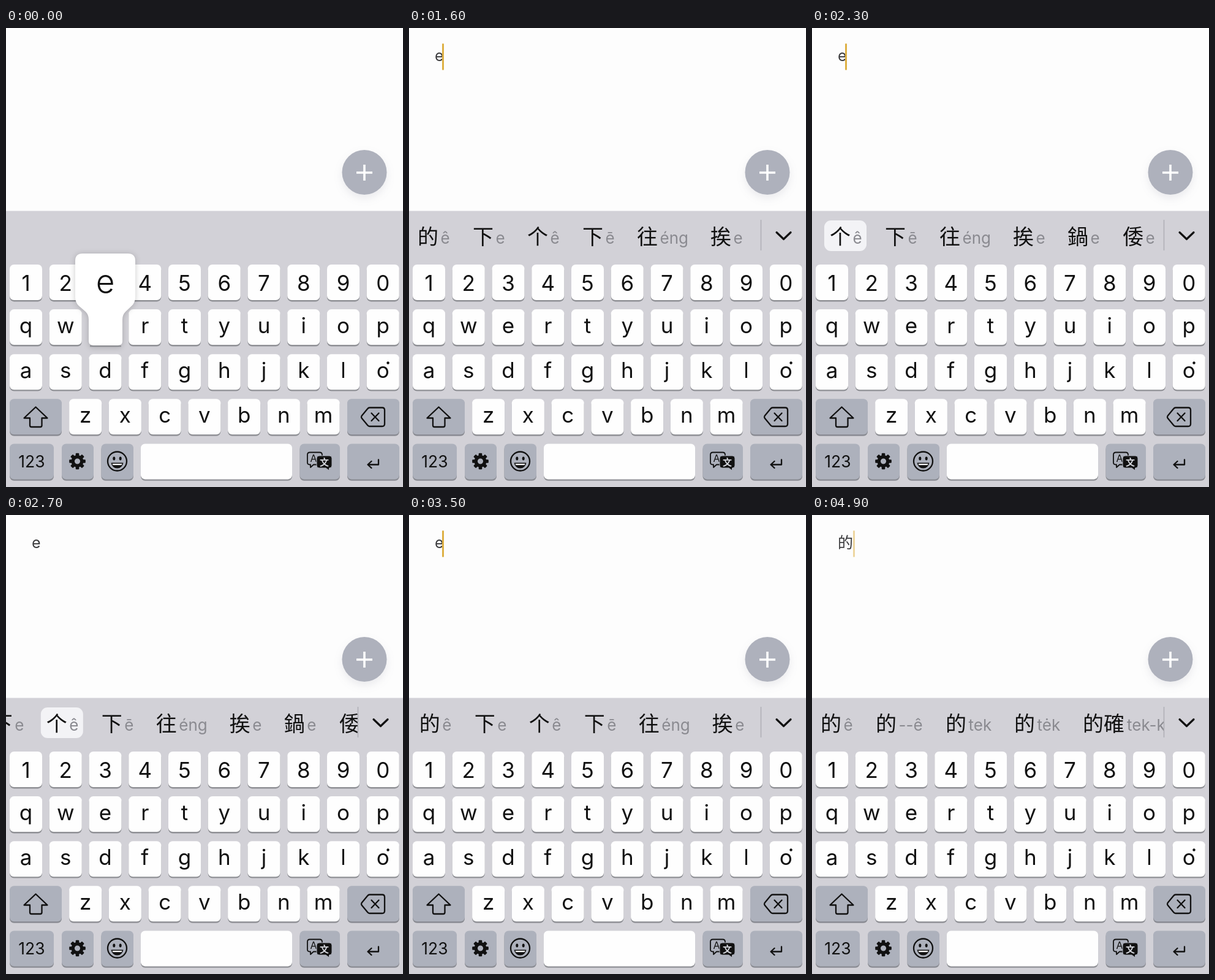
Write an HTML page that moves like this. It is 648 by 749 pixels and loops after 5 s.

```html
<!DOCTYPE html>
<html lang="en">
<head>
<meta charset="utf-8">
<title>Keyboard suggestions</title>
<style>
  html, body { margin: 0; width: 100%; height: 100%; overflow: hidden; background: #fdfdfd; }
  svg { display: block; width: 100vw; height: 100vh; }
  text { font-family: Inter, "Noto Sans CJK SC", "Noto Sans CJK TC", "Noto Sans CJK JP", "Noto Sans CJK", sans-serif; fill: #111; }
  .mid { text-anchor: middle; }
  .sound { font-size: 26px; fill: #8a8a90; }
  .word { font-size: 34px; }
  .line { fill: none; stroke: #111; stroke-width: 2.3; stroke-linejoin: round; stroke-linecap: round; }
  #bubble { filter: drop-shadow(0 1px 5px #0003); }
  #add circle { filter: drop-shadow(0 6px 7px #5050701c); }
</style>
</head>
<body>
<svg viewBox="0 0 648 749" preserveAspectRatio="none">
  <defs><clipPath id="strip"><path d="M0 300H574V380H0z"/></clipPath></defs>

  <text id="typed" x="42" y="54" font-size="25" style="fill:#3a3a3c"></text>
  <rect id="caret" y="25.5" width="3" height="43" fill="#deb044"/>

  <g id="add">
    <circle cx="585" cy="235.5" r="36.5" fill="#aeb1bc"/>
    <path d="M572 236H598M585 223V249" stroke="#fff" stroke-width="3.6"/>
  </g>

  <path d="M0 298.5H648V749H0z" fill="#d2d1d7"/>

  <g id="bar">
    <g clip-path="url(#strip)">
      <rect id="press" y="314" width="69" height="50" rx="11" fill="#f3f3f6"/>
      <g id="first"></g>
      <g id="second"></g>
    </g>
    <path d="M574.5 313V363" stroke="#afafb5" stroke-width="1.5"/>
    <path class="line" d="M600 333.500L611.500 344.500L623 333.500" style="stroke-width:3.2"/>
  </g>

  <g id="keys"></g>

  <g id="icons">
    <path class="line" d="M48.500 618.500L67.500 636.500H58.500V648.500Q58.500 651 56 651H41.500Q39 651 39 648.500V636.500H29.500z"/>
    <path class="line" d="M593.500 619.500H614Q618 619.500 618 623.500V646Q618 650 614 650H593.500Q591.500 650 590 648L580.500 636.500Q579.500 634.800 580.500 633L590 621.500Q591.500 619.500 593.500 619.500zM596.500 628.500L608.500 641M608.500 628.500L596.500 641"/>
    <path class="line" d="M608 704.500V712.500H591M596.500 707L590.500 712.500L596.500 718"/>

    <g transform="translate(116.500 707)">
      <circle r="7.300" fill="none" stroke="#111" stroke-width="5.500"/>
      <g id="teeth" fill="#111"></g>
    </g>

    <g transform="translate(181.500 707)">
      <circle class="line" r="15.500"/>
      <ellipse cx="-5.200" cy="-4.500" rx="2" ry="3" fill="#111"/>
      <ellipse cx="5.200" cy="-4.500" rx="2" ry="3" fill="#111"/>
      <path d="M-10 2.500H10Q8 11.500 0 11.500T-10 2.500z" fill="#111"/>
      <path d="M-8 4H8L7 6.300H-7z" fill="#fff"/>
    </g>

    <path class="line" style="stroke-width:1.800" d="M496 692.500H512Q516 692.500 516 696.500V709Q516 712.500 512 712.500H502L497 717V712.500H496Q492 712.500 492 709V696.500Q492 692.500 496 692.500z"/>
    <text class="mid" x="502" y="708" font-size="16">A</text>
    <path d="M511 698H528Q532 698 532 702V714Q532 718 528 718H527.500V722L522 718H511Q507 718 507 714V702Q507 698 511 698z" fill="#111" stroke="#adb1bc"/>
    <text class="mid" x="519.500" y="714" font-size="15" font-weight="700" style="fill:#d5d7dd">文</text>
  </g>

  <g id="bubble">
    <path fill="#fff" d="M125 368H199Q211 368 211 380V439Q211 448 205 453.500L195 463Q190 468 190 476V511Q190 518 183 518H142Q135 518 135 511V476Q135 468 130 463L119 453.500Q113 448 113 439V380Q113 368 125 368z"/>
    <path d="M137 519.200H188" stroke="#8d8e93" stroke-width="2"/>
    <text class="mid" x="162" y="431.500" font-size="53" font-weight="300">e</text>
  </g>
</svg>

<script>
const $ = id => document.getElementById(id);
const PITCH = 64.75, ROW = 73.1;

function key(x, row, w, label = '', dark = false, size = 35) {
  const y = 386 + row * ROW;
  const rect = (dy, fill) =>
    `<rect x="${x}" y="${y + dy}" width="${w}" height="58" rx="7" fill="${fill}"/>`;
  const base = row ? 425 + row * ROW : 428.5;
  return rect(2.4, dark ? '#898b92' : '#8f9095') + rect(0, dark ? '#adb1bc' : '#fefefe') +
    `<text class="mid" x="${x + w / 2}" y="${base}" font-size="${size}">${label}</text>`;
}

const letters = ['1234567890', 'qwertyuiop', 'asdfghjklo', 'zxcvbnm'];
$('keys').innerHTML = letters.map((line, row) => [...line].map((c, i) =>
  key(6 + PITCH * (i + (row === 3 ? 1.5 : 0)), row, 53, c)).join('')).join('') +
  key(6, 3, 85, '', true) + key(557, 3, 85, '', true) +
  key(6, 4, 72, '123', true, 26.5) + key(91, 4, 52, '', true) + key(155.5, 4, 52.5, '', true) +
  key(220, 4, 247) + key(479.5, 4, 65.5, '', true) + key(557, 4, 85, '', true) +
  '<circle cx="623.5" cy="546.5" r="2.2" fill="#111"/>';

$('teeth').innerHTML = Array.from({ length: 8 }, (_, i) =>
  `<rect x="-2.8" y="-13.3" width="5.6" height="5" rx="1.2" transform="rotate(${i * 45})"/>`).join('');

const words = list => list.map(([x, word, sound]) =>
  `<text class="word" x="${x - 1}" y="352.500">${word}</text>` +
  `<text class="sound" x="${x + 2 + 34.5 * word.length}" y="351.500">${sound}</text>`).join('');

$('first').innerHTML = words([[15, '的', 'ê'], [105, '下', 'e'], [194, '个', 'ê'], [284, '下', 'ē'],
  [373, '往', 'éng'], [493, '挨', 'e'], [582, '鍋', 'e'], [672, '倭', 'e']]);
$('second').innerHTML = words([[15, '的', 'ê'], [105, '的', '--ê'], [219, '的', 'tek'],
  [331, '的', 'tėk'], [443, '的確', 'tek-khak']]);

// Times in ms
const LOOP = 5000, TYPE = 200, PICK = 3800;
const drag = [[1700, 0], [2300, -164], [2500, -178], [3100, 18], [3200, 18], [3600, 0]];

const clamp = v => Math.min(1, Math.max(0, v));
const ramp = (t, a, b) => clamp((t - a) / (b - a));

function scrollAt(t) {
  let x = 0;
  for (let i = 1; i < drag.length; i++) {
    const [a, from] = drag[i - 1], [b, to] = drag[i];
    const k = ramp(t, a, b);
    if (t >= a) x = from + (to - from) * k * k * (3 - 2 * k);
  }
  return x;
}

function caretAt(t) {
  if (t < TYPE) return 0;
  const p = (t < PICK ? t - TYPE : Math.max(0, t - 4050)) % 1000;
  return 1 - ramp(p, 400, 500) + ramp(p, 800, 900);
}

const show = (id, on) => $(id).style.display = on ? '' : 'none';

function draw(t) {
  const picked = t >= PICK, x = scrollAt(t);
  show('bubble', t < TYPE);
  show('bar', t >= TYPE);
  show('first', !picked);
  show('second', picked);
  $('first').setAttribute('transform', `translate(${x})`);

  $('typed').textContent = picked ? '的' : t >= TYPE ? 'e' : '';
  $('caret').setAttribute('x', picked ? 67 : 54);
  $('caret').setAttribute('opacity', caretAt(t));

  const tap = t >= 3600;
  $('press').setAttribute('x', tap ? 5 : 184 + x);
  $('press').setAttribute('opacity', tap ? 1 - ramp(t, 3700, 4050) :
    t >= 1700 ? 1 - ramp(t, 3100, 3400) : 0);
}

const start = performance.now();
function tick() {
  const t = (performance.now() - start) % LOOP;
  draw(Math.floor(t / 100) * 100);
  requestAnimationFrame(tick);
}
draw(0);
requestAnimationFrame(tick);
</script>
</body>
</html>
```
